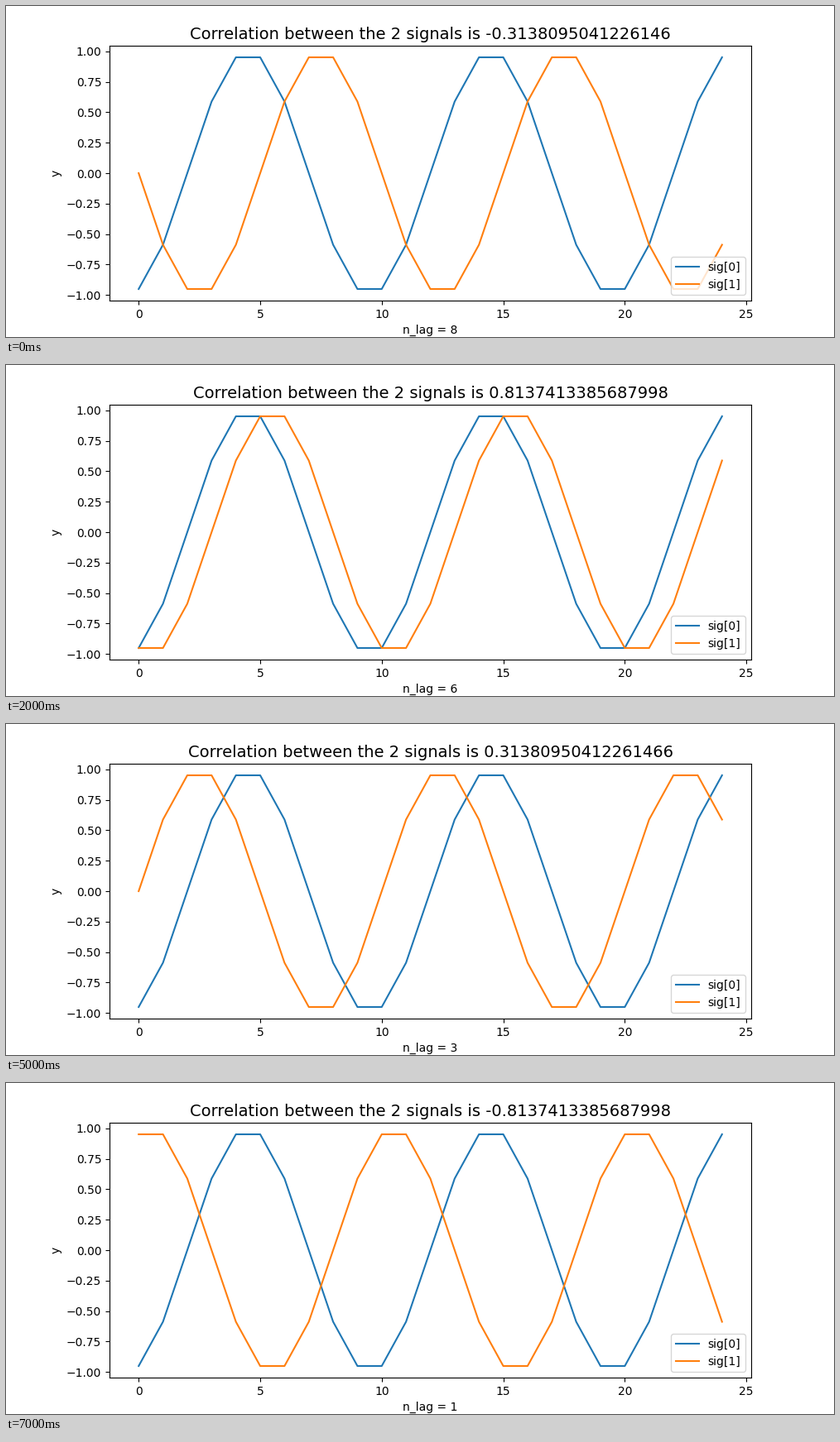
A matplotlib script that plays this animation: 1000x400 px, repeating every 8 s.

```python
import matplotlib.pyplot as plt
import numpy as np
from matplotlib.animation import FuncAnimation

PERIOD = 10
FIRST_LAG = 8
# Printed at full float precision, one entry per lag from 8 down to 1.
CORRELATIONS = [
    "-0.3138095041226146",
    "0.31380950412261466",
    "0.8137413385687998",
    "0.9999999999999998",
    "0.8137413385687994",
    "0.31380950412261466",
    "-0.31380950412261505",
    "-0.8137413385687998",
]

plt.rcParams["font.family"] = "DejaVu Sans"
samples = np.arange(25)


def wave(offset):
    return np.sin(2 * np.pi * (samples + offset) / PERIOD)


fig, ax = plt.subplots(figsize=(10, 4), dpi=100)
ax.plot(samples, wave(-2), label="sig[0]")
lagged, = ax.plot(samples, wave(3 - FIRST_LAG), label="sig[1]")
ax.set_ylabel("y")
ax.legend(loc="lower right")


def update(frame):
    lag = FIRST_LAG - frame
    lagged.set_ydata(wave(3 - lag))
    ax.set_title(f"Correlation between the 2 signals is {CORRELATIONS[frame]}",
                 fontsize=14)
    ax.set_xlabel(f"n_lag = {lag}")
    return lagged,


anim = FuncAnimation(fig, update, frames=len(CORRELATIONS), interval=1000,
                     repeat=True, repeat_delay=0, blit=False)
plt.show()
```
